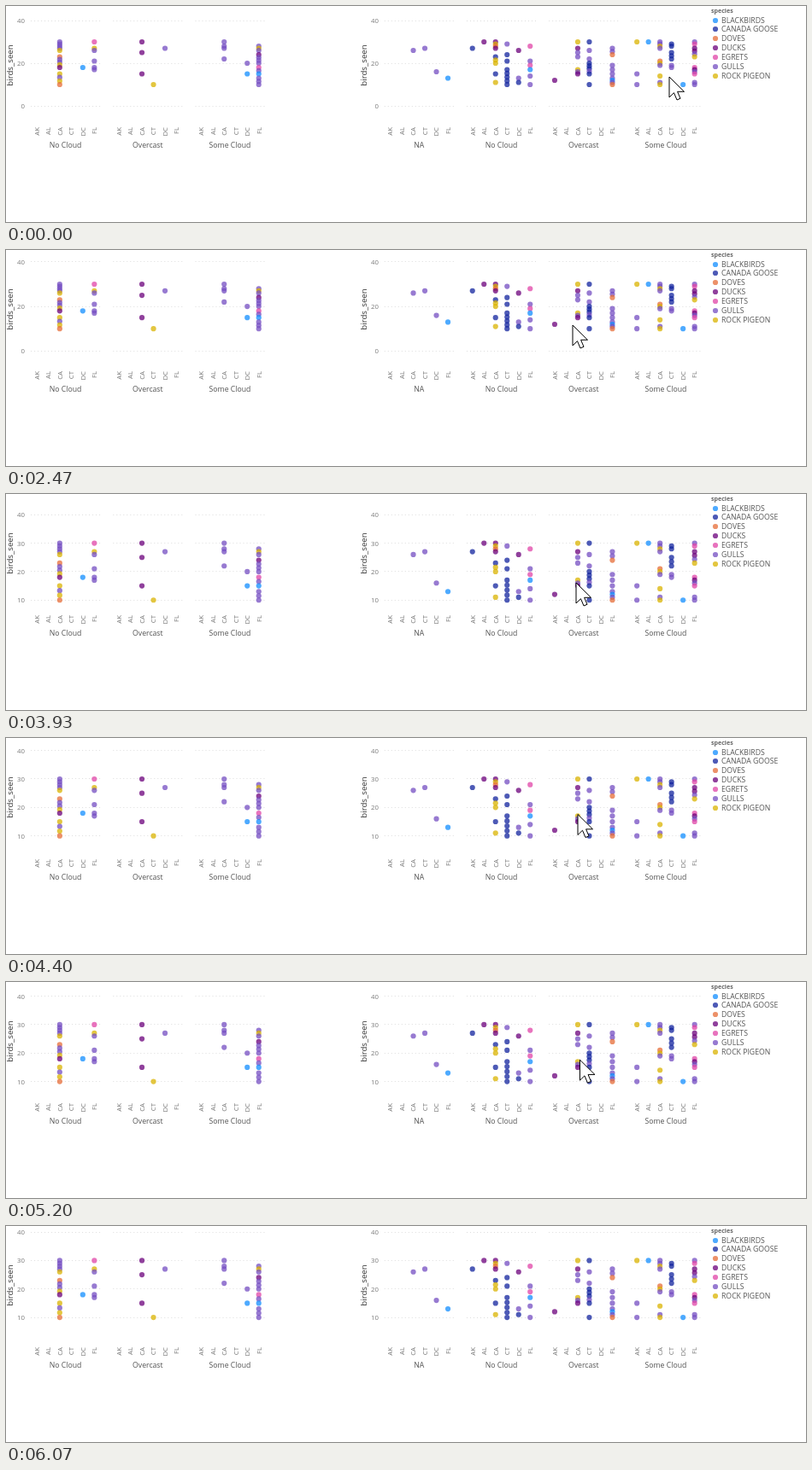
These frames come from a looping animation (936 px wide and 253 px high, 6.14 s). An HTML page:

```html
<!DOCTYPE html>
<html lang="en">
<head>
<meta charset="utf-8">
<title>Birds seen</title>
<style>
html, body { margin: 0; width: 100%; height: 100%; overflow: hidden; background: #fff; }
svg { display: block; font: 8.7px "Open Sans", sans-serif; fill: #555; }
.middle { text-anchor: middle; }
.end { text-anchor: end; }
.tick { font-size: 7.8px; fill: #777; }
.axis { font-size: 9.7px; fill: #333; }
.heading { font-size: 7.1px; font-weight: 700; fill: #666; }
.grid { stroke: #ddd; stroke-dasharray: 1 3; }
.dot { fill-opacity: .75; }
</style>
</head>
<body>
<svg width="936" height="253" viewBox="0 0 936 253">
  <g id="frame"></g>
  <g id="plot"></g>
  <path id="cursor" d="M0 0V24L5.5 18.7L9 27L13 25.3L9.6 17.3H17.5Z" fill="#fff" stroke="#000"/>
</svg>
<script>
const LOOP = 6140, STEP = 66.7;
const STATES = ["AK", "AL", "CA", "CT", "DC", "FL"];
const SPECIES = {
  b: ["BLACKBIRDS", "#118dff"], c: ["CANADA GOOSE", "#12239e"], d: ["DOVES", "#e66c37"],
  k: ["DUCKS", "#6b007b"], e: ["EGRETS", "#e044a7"], g: ["GULLS", "#744ec2"],
  p: ["ROCK PIGEON", "#d9b300"]
};

// "ggp30:27" spreads two gulls and a pigeon evenly from 30 down to 27
const PANELS = [
  { axis: 22, center: 69.6, facets: {
    "No Cloud": "CA ggggp30:26 dggpk23:18 pgpd15:10 DC b18 FL e30 pg27:26 g21 gg18:17",
    "Overcast": "CA kk30:25 k15 CT p10 DC g27",
    "Some Cloud": "CA g30 gg28:27 g22 DC gb20:15 FL gpg28:26 kggg24:20 egb18:15 ggg13:10"
  } },
  { axis: 436, center: 483.3, facets: {
    "NA": "CA g26 CT g27 DC g16 FL b13",
    "No Cloud": "AK c27 AL k30 CA kpdk30:27 cpp23:20 cp15:11 CT g29 cc24:21 ccccc17:10 DC k26 gc13:11 FL e28 geb21:17 gg14:10",
    "Overcast": "AK k12 CA p30 kgg27:23 pgk17:15 CT c30 gg26:22 cccgc20:15 c10 FL ggd27:24 gggg19:13 bgd12:10",
    "Some Cloud": "AK p30 gg15:10 AL b30 CA ggpg30:27 dpg21:19 p14 gp11:10 CT cc29:28 ccc25:22 gg19:18 DC b10 FL ge30:29 kkgp27:23 ekge18:15 gg11:10"
  } }
];

// Pointer moves: start ms, end ms, x, y
const HOME = [776, 83];
const MOVES = [
  [0, 670, 632, 82], [1170, 1800, 667, 90], [1800, 2130, 663, 88], [2800, 2870, 662, 70.6],
  [3200, 3930, 667, 104], [4130, 4370, 669, 89.5], [4800, 4970, 671, 97],
  [5040, 5400, 672, 84], [5530, 6060, 940, 256]
];
const GRAB = 3200, RELEASE = 5480;
const FOCUS = 87;

const $ = id => document.getElementById(id);
const clamp = (v, lo = 0, hi = 1) => Math.min(hi, Math.max(lo, v));
const text = (x, y, s, cls, turn) =>
  `<text class="${cls}" ${turn ? `transform="translate(${x} ${y}) rotate(-90)"` : `x="${x}" y="${y}"`}>${s}</text>`;
const dot = (x, y, key) =>
  `<circle class="dot" cx="${x}" cy="${y}" r="3.1" fill="${SPECIES[key][1]}"/>`;
const stateX = (center, i) => center + (i - 2.5) * 13.5;

function pointer(t) {
  let [x, y] = HOME;
  for (const [start, end, toX, toY] of MOVES) {
    const u = clamp((t - start) / (end - start));
    x += (toX - x) * u;
    y += (toY - y) * u;
  }
  return [x, y];
}

// Two wheel notches shrink the visible range; dragging follows the pointer one step late
function view(t) {
  const span = 40 - 5 * clamp((t - 2400) / 200) - (t > 2860 ? 5 : 0);
  const scale = 100 / span;
  const dragged = pointer(clamp(t - STEP, GRAB, RELEASE))[1] - pointer(GRAB)[1];
  return { scale, toY: v => FOCUS + (12 - v) * scale + dragged };
}

const points = [], centers = [];

function addPoints(center, data) {
  let x;
  for (const word of data.split(" ")) {
    const state = STATES.indexOf(word);
    if (state >= 0) { x = stateX(center, state); continue; }
    const [, keys, from, to = from] = word.match(/([a-z]+)(\d+):?(\d+)?/);
    [...keys].forEach((key, i) =>
      points.push([x, +from + (to - from) * i / Math.max(1, keys.length - 1), key]));
  }
}

let fixed = text(825, 8.3, "species", "heading");
Object.keys(SPECIES).forEach((key, i) => {
  const y = Math.round(16.6 + i * 10.85);
  fixed += dot(830, y, key) + text(837, y + 3, SPECIES[key][0], "");
});
for (const { axis, center, facets } of PANELS) {
  fixed += text(axis - 14, 69.5, "birds_seen", "axis middle", true);
  Object.entries(facets).forEach(([title, data], f) => {
    const cx = center + f * 96.2;
    centers.push(cx);
    fixed += text(cx, 166, title, "middle");
    STATES.forEach((s, i) => fixed += text(stateX(cx, i) + 2.8, 142, s, "tick end", true));
    addPoints(cx, data);
  });
}
$("frame").innerHTML = fixed;

function drawPlot({ scale, toY }) {
  let out = "";
  for (let v = 0; v <= 40; v += scale > 3 ? 10 : 20) {
    const y = toY(v);
    if (y < 2 || y > 132) continue;
    for (const c of centers) out += `<path class="grid" d="M${c - 40.5} ${Math.floor(y) + .5}h81"/>`;
    for (const p of PANELS) out += text(p.axis, y + 3, v, "tick end");
  }
  for (const [x, v, key] of points) out += dot(x, toY(v), key);
  $("plot").innerHTML = out;
}

let last = -1;
function tick(now) {
  const step = Math.floor((now % LOOP + 5) / STEP);
  if (step !== last) {
    last = step;
    drawPlot(view(step * STEP));
    $("cursor").setAttribute("transform", `translate(${pointer(step * STEP).join(" ")})`);
  }
  requestAnimationFrame(tick);
}
tick(performance.now());
</script>
</body>
</html>
```
